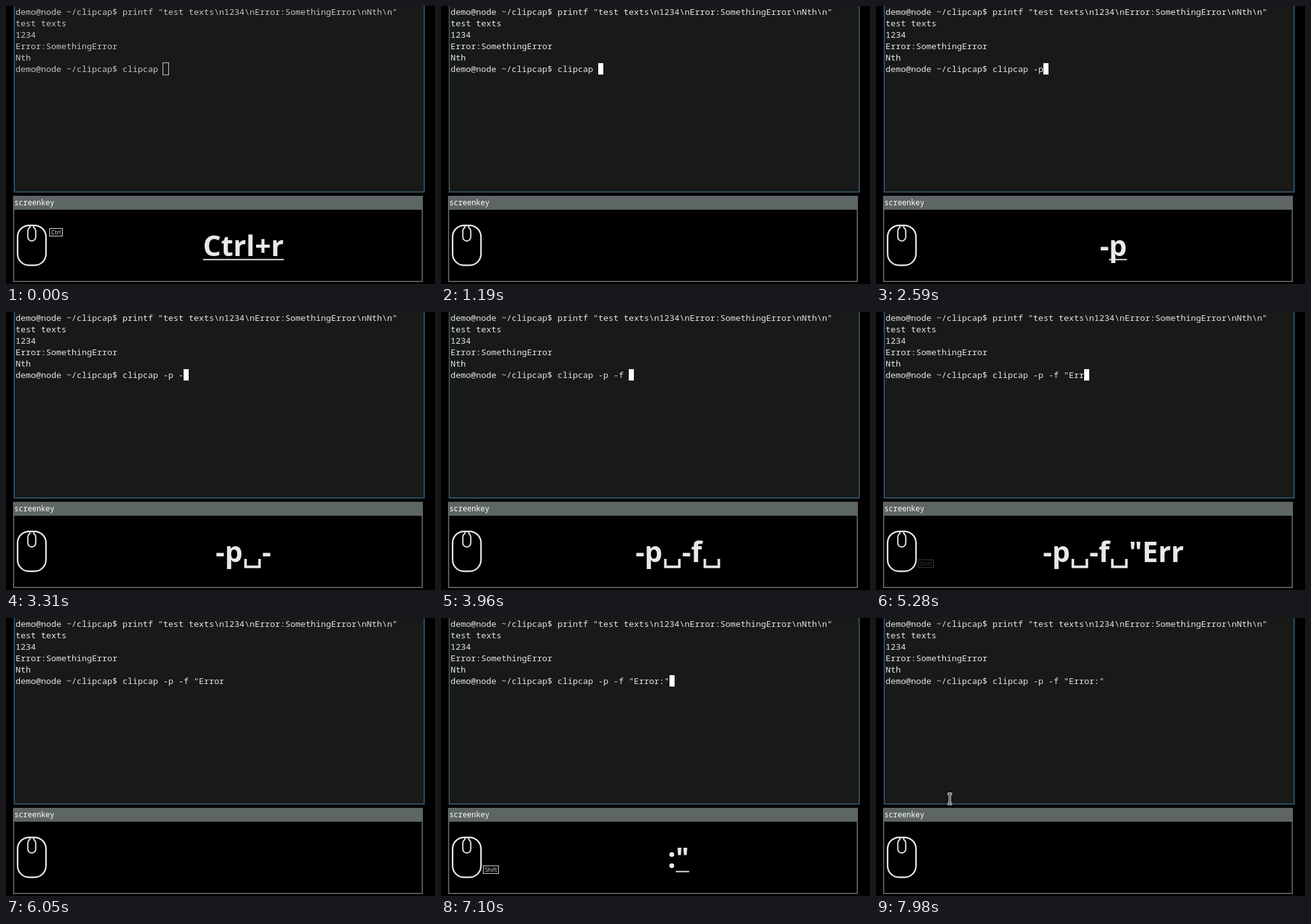
Animation of 674 by 438 pixels, one loop 8000 ms. Source, as an HTML page with a canvas:

```html
<!DOCTYPE html>
<html lang="en">
<head>
<meta charset="utf-8">
<title>Terminal demo</title>
<style>
  html, body { margin: 0; width: 100%; height: 100%; overflow: hidden; background: #000; }
  canvas { display: block; }
</style>
</head>
<body>
<canvas id="stage" width="674" height="438"></canvas>
<script>
const ctx = document.getElementById('stage').getContext('2d');
const LOOP = 8000, FOCUS = 30, BLINK = 600;
const ECHO = 30, RECENT = 160, TIMEOUT = 440, FADE = 870;
const MONO = '"Noto Sans Mono", monospace';
const SANS = '"Noto Sans", "Open Sans", sans-serif';
const INK = '#e8e8e8';
const COL = 8, ROW = 18, BIG = 44.5, SPACE_W = 30.5;

const prompt = 'demo@node ~/clipcap$ ';
const output = [
  prompt + 'printf "test texts\\n1234\\nError:SomethingError\\nNth\\n"',
  'test texts', '1234', 'Error:SomethingError', 'Nth'
];

// Time each character reaches the terminal
const typed = [
  [2320, '-'], [2560, 'p'], [2770, ' '], [3120, '-'], [3470, 'f'], [3770, ' '],
  [4180, '"'], [4510, 'E'], [4790, 'r'], [5040, 'r'], [5310, 'o'], [5450, 'r'],
  [6570, ':'], [6940, '"']
];
const presses = [[-60, 'Ctrl+r'], ...typed.map(([t, c]) => [t + ECHO, c])];
const modifiers = [
  { label: 'Ctrl', x: 68, y: 350, w: 21, down: -200, up: 30 },
  { label: 'Shift', x: 66, y: 390, w: 25, down: 4020, up: 4620 },
  { label: 'Shift', x: 66, y: 390, w: 25, down: 6370, up: 7050 }
];

function rect(x, y, w, h, color) {
  ctx.fillStyle = color;
  ctx.fillRect(x, y, w, h);
}

function text(str, x, y, font, color) {
  ctx.font = font;
  ctx.fillStyle = color;
  ctx.fillText(str, x, y);
}

function frame(x, y, w, h, width, color) {
  ctx.strokeStyle = color;
  ctx.lineWidth = width;
  ctx.strokeRect(x + width / 2, y + width / 2, w - width, h - width);
}

function drawTerminal(t) {
  const focused = t >= FOCUS;
  const color = focused ? '#e6e6e4' : '#c2c3c1';
  const font = `13.333px ${MONO}`;
  rect(12, -4, 646, 298, '#181a18');
  frame(12, -4, 646, 298, 2, '#304d62');

  const keys = typed.filter(k => k[0] <= t);
  const line = prompt + 'clipcap ' + keys.map(k => k[1]).join('');
  [...output, line].forEach((s, i) => text(s, 15, 14 + i * ROW, font, color));

  const x = 15 + line.length * COL;
  const since = t - (keys.length ? keys[keys.length - 1][0] : -10);
  if (!focused) frame(x - 1, 89, 10, 20, 1, '#d0d0ce');
  else if (Math.floor(since / BLINK) % 2 === 0) rect(x, 90, 8, 18, '#fff');
}

function drawMouse() {
  ctx.strokeStyle = INK;
  ctx.lineWidth = 2.4;
  ctx.beginPath();
  ctx.roundRect(18.2, 345.7, 44.6, 62.8, 18);
  ctx.stroke();
  ctx.lineWidth = 2;
  ctx.beginPath();
  ctx.moveTo(37.5, 346);
  ctx.lineTo(37.5, 349);
  ctx.quadraticCurveTo(34.3, 351, 34.3, 355);
  ctx.lineTo(34.3, 364);
  ctx.arc(40.5, 364, 6.2, Math.PI, 0, true);
  ctx.lineTo(46.7, 355);
  ctx.quadraticCurveTo(46.7, 351, 43.5, 349);
  ctx.lineTo(43.5, 346);
  ctx.stroke();
}

function drawModifier(m, t) {
  if (t < m.down) return;
  const alpha = 1 - Math.max(0, t - m.up) / FADE;
  if (alpha <= 0) return;
  ctx.globalAlpha = alpha;
  frame(m.x, m.y, m.w, 13, 1, INK);
  ctx.textAlign = 'center';
  text(m.label, m.x + m.w / 2, m.y + 10, `9px ${SANS}`, INK);
  ctx.textAlign = 'left';
  ctx.globalAlpha = 1;
}

// Keys of the current burst, newest last
function burst(t) {
  const keys = [];
  let next = t;
  for (const key of presses.filter(k => k[0] <= t).reverse()) {
    if (next - key[0] >= TIMEOUT) break;
    keys.unshift(key);
    next = key[0];
  }
  return keys;
}

function drawKeys(t) {
  const keys = burst(t);
  if (!keys.length) return;
  const font = `bold ${BIG}px ${SANS}`;
  ctx.font = font;
  const widths = keys.map(k => k[1] === ' ' ? SPACE_W : ctx.measureText(k[1]).width);
  let x = 373 - widths.reduce((a, b) => a + b, 0) / 2;
  keys.forEach(([time, label], i) => {
    const w = widths[i];
    if (label === ' ') {
      ctx.strokeStyle = INK;
      ctx.lineWidth = 4;
      ctx.beginPath();
      ctx.moveTo(x + 4.5, 389);
      ctx.lineTo(x + 4.5, 401.5);
      ctx.lineTo(x + w - 4, 401.5);
      ctx.lineTo(x + w - 4, 389);
      ctx.stroke();
    } else {
      text(label, x, 394, font, INK);
    }
    if (i === keys.length - 1 && t - time < RECENT) rect(x, 398.5, w, 2, INK);
    x += w;
  });
}

function drawKeyWindow(t) {
  frame(11, 299, 644, 136, 2, '#565b5b');
  rect(13, 321, 640, 112, '#000');
  rect(11, 299, 644, 22, '#5d6565');
  text('screenkey', 13, 314, `11.7px ${MONO}`, '#fff');
  drawMouse();
  modifiers.forEach(m => drawModifier(m, t));
  drawKeys(t);
}

function drawPointer(t) {
  const p = (t - 7760) / 180;
  if (p < 0) return;
  const left = Math.pow(1 - Math.min(p, 1), 2);
  const x = 116 + 24 * left, y = 285 + 7 * left;
  const beam = () => {
    ctx.beginPath();
    for (const s of [-1, 1]) {
      ctx.moveTo(x - 3.5, y + s * 8);
      ctx.lineTo(x + 3.5, y + s * 8);
    }
    ctx.moveTo(x, y - 8);
    ctx.lineTo(x, y + 8);
    ctx.stroke();
  };
  ctx.lineWidth = 3.4;
  ctx.strokeStyle = '#fff';
  beam();
  ctx.lineWidth = 1.2;
  ctx.strokeStyle = '#000';
  beam();
}

const start = performance.now();
function draw() {
  const t = (performance.now() - start) % LOOP;
  rect(0, 0, 674, 438, '#000');
  drawTerminal(t);
  drawKeyWindow(t);
  drawPointer(t);
  requestAnimationFrame(draw);
}
draw();
</script>
</body>
</html>
```
